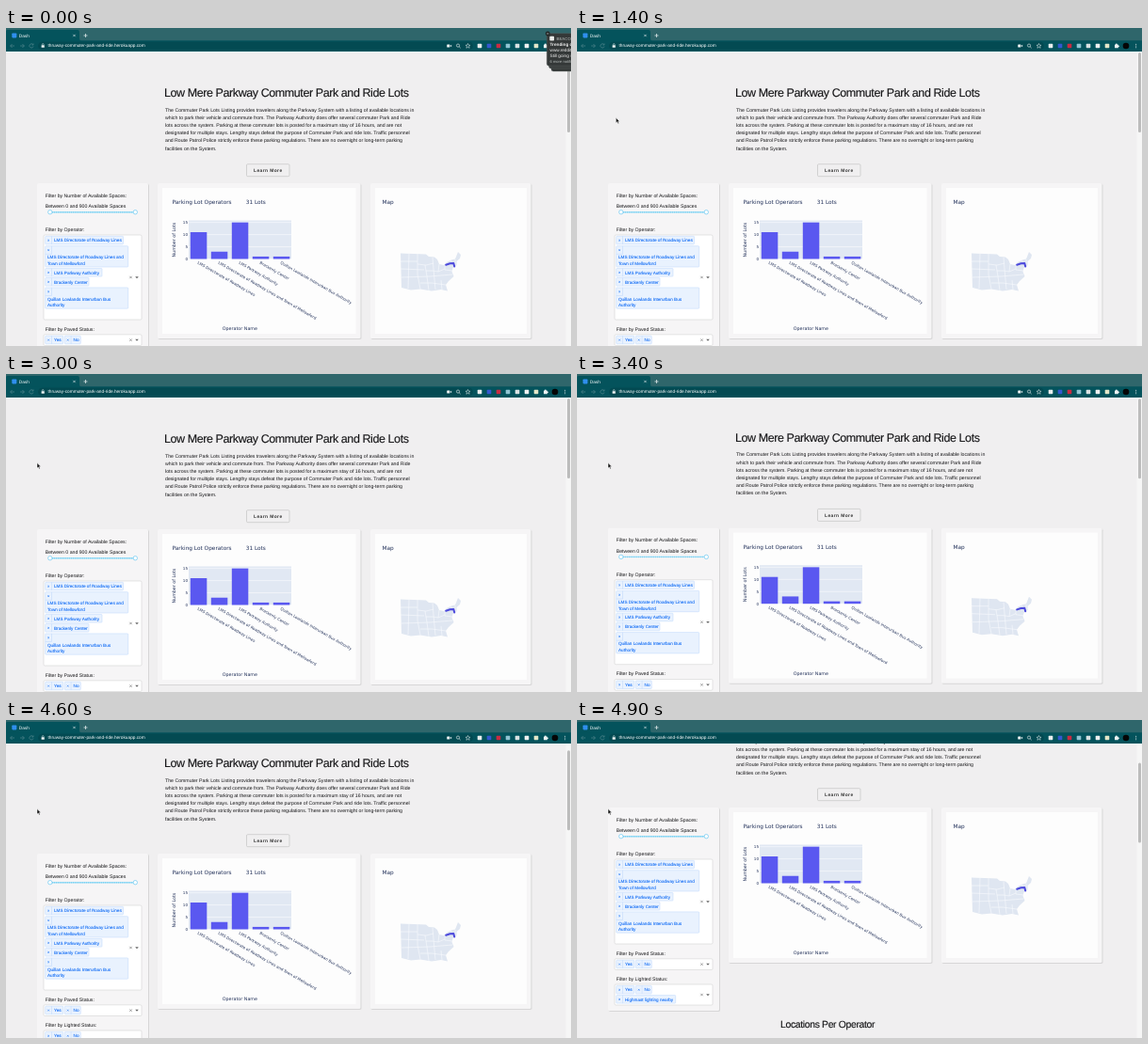
Animation, 600 px wide and 338 px high, one loop 5 s. Source, as an HTML page:

```html
<!DOCTYPE html>
<html lang="en">
<head>
<meta charset="utf-8">
<title>Dash</title>
<style>
html, body { margin: 0; width: 100%; height: 100%; overflow: hidden; background: #f0eff0; }
svg { display: block; width: 100%; height: 100%; }
text { font-family: "Liberation Sans", Arial, sans-serif; font-size: 5.2px; fill: #141416; text-rendering: geometricPrecision; white-space: pre; }
.plot text { font-family: "DejaVu Sans", Verdana, sans-serif; fill: #22315a; }
.plot .title { font-size: 5.8px; }
.plot .axis { font-size: 4.8px; }
.plot .tick { font-size: 4.1px; }
.h2 { font-size: 12.5px; letter-spacing: -.417px; stroke: #141416; stroke-width: .12px; }
.h4 { font-size: 10.4px; letter-spacing: -.33px; stroke: #141416; stroke-width: .12px; }
.btn { font-size: 4.9px; font-weight: bold; letter-spacing: .417px; fill: #333; }
.chip { font-size: 4.65px; fill: #0a68f5; stroke: #0a68f5; stroke-width: .08px; }
.ui { font-size: 4.76px; fill: #fff; }
.note { font-size: 4.7px; fill: #f0f0f0; }
</style>
</head>
<body>
<svg viewBox="0 0 600 338">
  <defs>
    <filter id="soft" x="-5%" y="-5%" width="110%" height="110%">
      <feDropShadow dx=".8" dy=".8" stdDeviation=".6" flood-color="#d0d0d0"/>
    </filter>
  </defs>
  <rect width="600" height="338" fill="#f0eff0"/>
  <g id="page"></g>
  <g id="bar">
    <rect x="594.5" y="25" width="5.5" height="313" fill="#f6f6f6"/>
    <rect id="thumb" x="596" y="26" width="3" height="85" rx="1.5" fill="#bcbcbc"/>
  </g>
  <g id="chrome"></g>
  <path id="mouse" d="M0 0V5.6L1.3 4.5L2.2 6.4L3.2 5.9L2.3 4.1H4Z" fill="#111" stroke="#fff" stroke-width=".5"/>
  <g id="note"></g>
</svg>
<script>
const $ = id => document.getElementById(id);
const text = (x, y, s, cls = "", more = "") => `<text x="${x}" y="${y}" class="${cls}" ${more}>${s}</text>`;
const rect = (x, y, w, h, fill, more = "") => `<rect x="${x}" y="${y}" width="${w}" height="${h}" fill="${fill}" ${more}/>`;
const line = (d, color, w, more = "") => `<path d="${d}" fill="none" stroke="${color}" stroke-width="${w}" ${more}/>`;
const dot = (x, y, r, fill, more = "") => `<circle cx="${x}" cy="${y}" r="${r}" fill="${fill}" ${more}/>`;
const cross = (x, y, r, color, w = .6) => line(`M${x - r} ${y - r}l${2 * r} ${2 * r}m0 ${-2 * r}l${-2 * r} ${2 * r}`, color, w);
const card = (x, y, w, h) => rect(x, y, w, h, "#f6f5f6", 'rx="1.5" filter="url(#soft)"');

function intro() {
  const lines = [
    "The Commuter Park Lots Listing provides travelers along the Parkway System with a listing of available locations in",
    "which to park their vehicle and commute from. The Parkway Authority does offer several commuter Park and Ride",
    "lots across the system. Parking at these commuter lots is posted for a maximum stay of 16 hours, and are not",
    "designated for multiple stays. Lengthy stays defeat the purpose of Commuter Park and ride lots. Traffic personnel",
    "and Route Patrol Police strictly enforce these parking regulations. There are no overnight or long-term parking",
    "facilities on the System."
  ];
  return text(168, 73.1, "Low Mere Parkway Commuter Park and Ride Lots", "h2")
    + lines.map((s, i) => text(169, 88.8 + i * 8.15, s)).join("")
    + rect(255.5, 144.7, 45.5, 13, "#f0eff0", 'rx="1.2" stroke="#bcbcbc" stroke-width=".6"')
    + text(263, 153, "Learn More", "btn");
}

// One or two lines of label; a two-line chip has its cross on a row above.
function chip(x, y, w, ...rows) {
  const tall = rows.length > 1, h = tall ? 22.3 : 8.6;
  const edge = "#bcd6fa";
  return rect(x, y, w, h, "#e9f2fe", `rx=".8" stroke="${edge}" stroke-width=".5"`)
    + line(`M${x + 6.8} ${y}v8.6` + (tall ? "h-6.8" : ""), edge, .5)
    + cross(x + 3.4, y + 4.4, .9, "#0a68f5", .5)
    + rows.map((s, i) => text(x + (tall ? 2.3 : 9.3), y + (tall ? 13.6 + i * 6.9 : 6), s, "chip")).join("");
}

function dropdown(y, h) {
  const m = y + h / 2;
  return rect(40, y, 104, h, "#fff", 'rx="1.2" stroke="#cacaca" stroke-width=".5"')
    + cross(132.5, m, 1.2, "#666") + `<path d="M137.2 ${m - .8}h3.6l-1.8 2z" fill="#666"/>`;
}

function filters() {
  const ring = 'stroke="#79cdf2" stroke-width=".8"';
  return card(33, 165, 118, 216)
    + text(41.7, 179.5, "Filter by Number of Available Spaces:")
    + text(41.7, 191.2, "Between 0 and 900 Available Spaces")
    + line("M47 195.7H137", "#a4e0f8", 1.4)
    + line("M47 195.7H137", "#66c6ec", 1.5, 'stroke-dasharray=".6 1.4"')
    + dot(46.8, 195.7, 2.2, "#fff", ring) + dot(137.3, 195.7, 2.2, "#fff", ring)
    + text(41.7, 216.3, "Filter by Operator:")
    + dropdown(220, 90)
    + chip(41.7, 221.3, 82.8, "LMS Directorate of Roadway Lines")
    + chip(41.7, 231.7, 88, "LMS Directorate of Roadway Lines and", "Town of Mellowford")
    + chip(41.7, 255.5, 60.3, "LMS Parkway Authority")
    + chip(41.7, 265.5, 46.3, "Brackenly Center")
    + chip(41.7, 275.9, 88, "Quillan Lowlands Interurban Bus", "Authority")
    + text(41.7, 321.8, "Filter by Paved Status:")
    + dropdown(325.8, 11.7)
    + chip(41.7, 327.2, 19, "Yes") + chip(62.3, 327.2, 17, "No")
    + text(41.7, 349, "Filter by Lighted Status:")
    + dropdown(353, 22)
    + chip(41.7, 354.4, 19, "Yes") + chip(62.3, 354.4, 17, "No")
    + chip(41.7, 364.5, 63, "Highmast lighting nearby");
}

function chart() {
  const bars = [
    ["LMS Directorate of Roadway Lines", 11],
    ["LMS Directorate of Roadway Lines and Town of Mellowford", 3],
    ["LMS Parkway Authority", 15],
    ["Brackenly Center", 1],
    ["Quillan Lowlands Interurban Bus Authority", 1]
  ];
  const y = v => 245.5 - v * 2.59;
  return card(161, 165, 215.5, 165) + rect(166, 170, 205.5, 155, "#fdfdfd")
    + text(176.5, 187.3, "Parking Lot Operators", "title") + text(254.7, 187.3, "31 Lots", "title")
    + rect(194, 204.5, 109, 41, "#e1e8f3")
    + [0, 5, 10, 15].map(v => line(`M194 ${y(v)}h109`, "#fff", .5)
      + text(193, y(v) + 1.6, v, "tick", 'text-anchor="end"')).join("")
    + bars.map(([s, v], i) => {
      const x = 195.8 + i * 22;
      return rect(x, y(v), 17.5, v * 2.59, "#5a58f0")
        + text(0, 0, s, "tick", `transform="translate(${x + 7.3} 250.3) rotate(30)"`);
    }).join("")
    + text(0, 0, "Number of Lots", "axis", 'transform="translate(179.6 243.5) rotate(-90)"')
    + text(229.8, 321, "Operator Name", "axis");
}

function map() {
  const land = "M419 239.5L446 240.5L449 243L455 243.5L458 246L460 251L465 252L468 249L473 246.5L477 245.5L480 238L483 241L482 245L478.5 248L479 252L474.5 255L473.5 259L475.5 264L470 269L467 273L469 279.5L462 278L452 279.5L440 277.5L430 278.5L420 276Z";
  const borders = "M428 239.5L427 277M437 240V262L440 277.5M445 252L447 264L449 279M453 244L454 256L456 278M460 251L459 259M462 268L463 278M419 248H437M419 256L444 257M420 265L450 264L474 262M437 251L446 252L454 250M446 258L453 258L459 259L466 256M440 271L452 271L467 273M466 252V257L474 258M472 247L475 251L479 251M477 246V250";
  return card(387, 165, 170.5, 165) + rect(392, 170, 161, 155, "#fdfdfd")
    + text(399.5, 187.3, "Map", "title")
    + `<path d="${land}" fill="#dfe6f1"/>` + line(borders, "#f8fafd", .6)
    + line("M467.2 251.7L471.5 250.3L475.3 250L476.2 253.6", "#4c49dc", 2, 'stroke-linecap="round" stroke-linejoin="round"');
}

function chrome() {
  const teal = "#04535c", dim = "#4f858b", ink = "#eef4f4";
  const blocks = [
    [503, "#e8eeee"], [513, "#3458cf"], [523, "#c92b42"], [533, "#8fc4d2"],
    [543, "#d9e2e3"], [553, "#eef1f1"], [563, "#e3e6c8"]
  ];
  return rect(0, 0, 600, 14, "#2f666b")
    + `<path d="M0 14V3Q0 2 2 2H76Q78 2 78 5V11Q78 13.5 80 14Z" fill="${teal}"/>`
    + rect(0, 13.3, 600, 11.7, teal)
    + rect(34, 14.6, 462, 8.8, "#034a52", 'rx="4.4"')
    + rect(6.3, 5.4, 5, 5, "#2f8fee", 'rx=".8"')
    + text(13.8, 9.8, "Dash", "ui") + cross(72.5, 8, 1.2, ink, .6)
    + line("M84.5 6v4m-2-2h4", ink, .7)
    + line("M9 19H4.6m2-2l-2 2l2 2M15 19h4.4m-2-2l2 2l-2 2", dim, .7)
    + line("M28.7 17.7a2.1 2.1 0 1 0 .3 1.8M29 16.4v1.6h-1.6", dim, .7)
    + rect(37.6, 18.2, 3.2, 2.6, ink, 'rx=".4"') + line("M38.3 18.3v-.8a.9 .9 0 0 1 1.8 0v.8", ink, .5)
    + text(44.5, 20.4, "thruway-commuter-park-and-ride.herokuapp.com", "ui")
    + rect(468.2, 17.6, 3.1, 2.8, ink, 'rx=".5"') + `<path d="M471.6 19l1.5-1.2v2.4z" fill="${ink}"/>`
    + dot(480, 18.6, 1.6, "none", `stroke="${ink}" stroke-width=".6"`) + line("M481.2 19.8l1.4 1.4", ink, .7)
    + line("M490.5 16.5l.7 1.7l1.8 .1l-1.4 1.2l.5 1.8l-1.6-1l-1.6 1l.5-1.8l-1.4-1.2l1.8-.1z", ink, .5)
    + blocks.map(([x, c]) => rect(x - 2.3, 16.7, 4.6, 4.6, c, 'rx=".7"')).join("")
    + rect(571, 17.6, 3.8, 3.6, ink, 'rx=".5"') + dot(572.8, 17.3, .9, ink) + dot(575, 19.3, .9, ink)
    + dot(583, 19, 3.3, "#050606")
    + [17.2, 19, 20.8].map(y => dot(593.7, y, .5, ink)).join("");
}

function note() {
  const panel = (x, y, h, c) => rect(x, y, 60, h, c, 'rx="2.5" stroke="#59605f" stroke-width=".4"');
  return panel(579, 20, 26, "#343838") + panel(576.5, 17, 26, "#3a3e3e") + panel(574.3, 5.7, 34.5, "#343838")
    + rect(577.3, 8.7, 4.8, 4.8, "#e7eae8", 'rx="1"')
    + text(584.5, 12.9, "BEACON", "note", 'style="fill:#b9bebd;font-size:4.4px"')
    + text(577.5, 19.3, "Trending on", "note", 'font-weight="bold"')
    + text(577.5, 25.2, "www.reddit.com", "note")
    + text(577.5, 31, "Still going strong", "note")
    + text(577.5, 36.8, "6 more notifications", "note", 'style="fill:#b9bebd;font-size:4.1px"')
    + dot(575.3, 6, 2.4, "#202424") + cross(575.3, 6, .8, "#d5d9d8", .5);
}

$("page").innerHTML = intro() + filters() + `<g class="plot">${chart()}${map()}</g>`
  + text(216, 398.7, "Locations Per Operator", "h4");
$("chrome").innerHTML = chrome();
$("note").innerHTML = note();

const scrollKeys = [[3300, 0], [3400, 1.3], [3500, 3.3], [3600, 6.3], [3800, 13.4], [4000, 18.7],
  [4200, 21.7], [4400, 22.8], [4600, 23], [4700, 30], [4800, 49], [4900, 72]];
const mouseKeys = [[0, 578, 12], [100, 572, 18], [200, 540, 36], [300, 468, 65], [400, 385, 89],
  [500, 318, 103], [600, 275, 107], [800, 202, 107], [1000, 112, 102], [1200, 58, 97], [1500, 33, 94.5]];
const noteKeys = [[0, 0], [100, 11], [200, 22], [300, 32]];

function at(keys, t, col = 1) {
  const i = keys.findIndex(k => k[0] > t);
  if (i < 0) return keys[keys.length - 1][col];
  if (!i) return keys[0][col];
  const a = keys[i - 1], b = keys[i];
  return a[col] + (b[col] - a[col]) * (t - a[0]) / (b[0] - a[0]);
}

const move = (id, x, y) => $(id).setAttribute("transform", `translate(${x} ${y})`);

function draw() {
  const t = Math.floor(performance.now() % 5000 / 100) * 100;
  const scroll = at(scrollKeys, t);
  move("page", 0, -scroll);
  move("thumb", 0, scroll * .27);
  move("mouse", at(mouseKeys, t), at(mouseKeys, t, 2));
  move("note", at(noteKeys, t), 0);
  requestAnimationFrame(draw);
}
draw();
</script>
</body>
</html>
```
